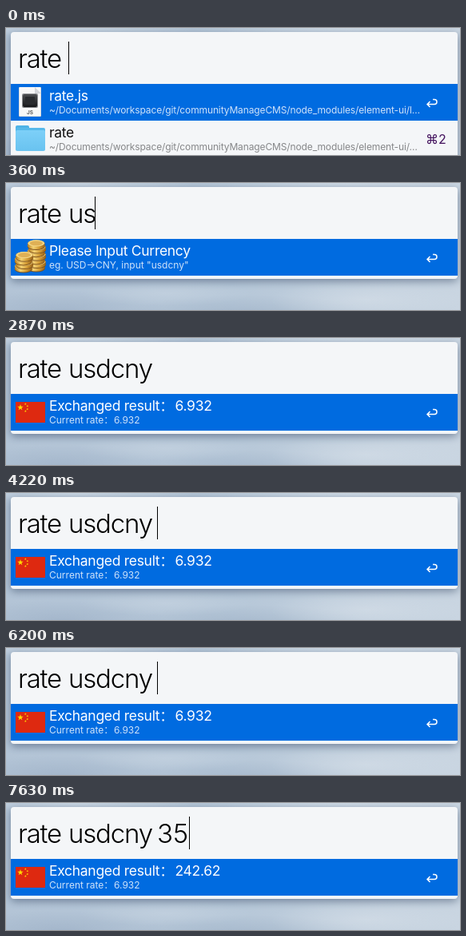
Write an HTML page with a canvas that moves like this. It is 568 px wide and 159 px high and loops after 7.99 s.

```html
<!DOCTYPE html>
<html lang="zh-CN">
<head>
<meta charset="utf-8">
<title>Currency launcher</title>
<style>
  html, body { margin: 0; width: 100%; height: 100%; overflow: hidden; background: #b4c5d7; }
  canvas, svg { position: absolute; left: 0; top: 0; width: 568px; height: 159px; }
  text {
    font-family: Inter, "Noto Sans CJK SC", "Noto Sans CJK", sans-serif;
    font-optical-sizing: none;
    white-space: pre;
  }
  .query { font-size: 33px; font-weight: 300; letter-spacing: -1.2px; fill: #000; }
  .amount { letter-spacing: 0; }
  .title { font-size: 17.5px; letter-spacing: -.3px; fill: #fff; }
  .sub { font-size: 12px; fill: #cfe2f9; }
  .path { letter-spacing: -.12px; }
  .title.plain { fill: #111; }
  .sub.plain { fill: #868789; }
  .key { font-size: 16px; fill: #45155f; }
  .badge { font-size: 6.5px; font-weight: 600; fill: #444; }
</style>
</head>
<body>
<canvas id="stage" width="568" height="159"></canvas>
<svg viewBox="0 0 568 159">
  <text class="query" x="15" y="50">rate</text>
  <text class="query" id="pair" x="78" y="50"></text>
  <text class="query amount" id="amount" x="189" y="50"></text>
  <g id="files">
    <text class="title" x="54" y="91">rate.js</text>
    <text class="sub path" x="54" y="107">~/Documents/workspace/git/communityManageCMS/node_modules/element-ui/l…</text>
    <text class="title plain" x="54" y="137">rate</text>
    <text class="sub path plain" x="54" y="153">~/Documents/workspace/git/communityManageCMS/node_modules/element-ui/…</text>
    <text class="key" x="525" y="145">⌘2</text>
    <text class="badge" x="26" y="108">JS</text>
  </g>
  <g id="prompt">
    <text class="title" x="54" y="91">Please Input Currency</text>
    <text class="sub" x="54" y="107">eg. USD-&gt;CNY, input "usdcny"</text>
  </g>
  <g id="rate">
    <text class="title" x="54" y="91">Exchanged result：</text>
    <text class="title" id="result" x="211.5" y="91"></text>
    <text class="sub" x="54" y="107">Current rate：</text>
    <text class="sub" x="135" y="107">6.932</text>
  </g>
</svg>
<script>
const LOOP = 7990;
const W = 568, H = 159;
const ctx = document.getElementById('stage').getContext('2d');
const el = id => document.getElementById(id);

// start time, currency pair, amount, caret x
const KEYS = [
  [0, '', '', 78], [270, 'u', '', 96], [360, 'us', '', 111], [450, 'usd', '', 130],
  [900, 'usdc', '', 148], [990, 'usdcn', '', 165], [1170, 'usdcny', '', 181],
  [3140, 'usdcny', '', 189], [4400, 'usdcny', '1', 206], [4490, 'usdcny', '10', 224],
  [4670, 'usdcny', '100', 245], [5930, 'usdcny', '10', 224], [6110, 'usdcny', '1', 206],
  [6200, 'usdcny', '', 189], [7360, 'usdcny', '3', 209], [7450, 'usdcny', '35', 229]
];
const VIEWS = [[0, 'files'], [360, 'prompt'], [2330, 'rate']];
const RESULTS = [
  [0, ''], [2330, '6.932'], [4670, '69.32'], [4760, '693.2'],
  [6020, '69.32'], [6200, '6.932'], [7450, '20.796'], [7630, '242.62']
];
const CARET_OFF = [[1790, 2330], [2870, 3140], [3680, 4220], [5210, 5750], [6730, 7360]];

const at = (list, t) => list.findLast(step => step[0] <= t);

function gradient(x0, y0, x1, y1, ...colors) {
  const g = ctx.createLinearGradient(x0, y0, x1, y1);
  colors.forEach((c, i) => g.addColorStop(i / (colors.length - 1), c));
  return g;
}

function rect(x, y, w, h, fill, r = 0) {
  ctx.fillStyle = fill;
  ctx.beginPath();
  ctx.roundRect(x, y, w, h, r);
  ctx.fill();
}

function ellipse(x, y, rx, ry, fill) {
  ctx.fillStyle = fill;
  ctx.beginPath();
  ctx.ellipse(x, y, rx, ry, 0, 0, Math.PI * 2);
  ctx.fill();
}

function cloud(x, y, rx, ry, rgb, alpha) {
  ctx.save();
  ctx.translate(x, y);
  ctx.scale(rx, ry);
  const g = ctx.createRadialGradient(0, 0, 0, 0, 0, 1);
  g.addColorStop(0, `rgba(${rgb},${alpha})`);
  g.addColorStop(1, `rgba(${rgb},0)`);
  ctx.fillStyle = g;
  ctx.fillRect(-1, -1, 2, 2);
  ctx.restore();
}

function wallpaper() {
  rect(0, 0, W, H, gradient(0, 0, W, 0, '#b3c4d6', '#b6c7d8', '#c9d5e1'));
  cloud(70, 160, 130, 26, '148,168,192', .5);
  cloud(300, 162, 150, 22, '150,170,193', .45);
  cloud(200, 138, 110, 16, '205,217,229', .45);
  cloud(450, 146, 120, 24, '215,224,233', .6);
  cloud(90, 0, 150, 12, '222,231,239', .6);
  cloud(420, 0, 190, 12, '222,231,239', .6);
}

function panel(height) {
  ctx.save();
  ctx.shadowColor = 'rgba(35,55,85,.5)';
  ctx.shadowBlur = 11;
  ctx.shadowOffsetY = 3;
  rect(6, 5, 559, height, '#f4f6f8', 4);
  ctx.restore();
  rect(6, 70, 559, 46, '#006be0');
}

function returnArrow() {
  ctx.strokeStyle = '#fff';
  ctx.lineWidth = 1.5;
  ctx.beginPath();
  ctx.moveTo(527, 95.5);
  ctx.lineTo(536, 95.5);
  ctx.arc(536, 92.5, 3, Math.PI / 2, -Math.PI / 2, true);
  ctx.lineTo(534, 89.5);
  ctx.moveTo(530.5, 92);
  ctx.lineTo(527, 95.5);
  ctx.lineTo(530.5, 99);
  ctx.stroke();
}

function scriptIcon() {
  rect(16, 74, 28, 37, '#b9bec6', 1);
  rect(16.5, 74, 27, 36.5, '#f8f8f8', 1);
  ctx.fillStyle = '#d4d6da';
  ctx.beginPath();
  ctx.moveTo(36, 74);
  ctx.lineTo(44, 82);
  ctx.lineTo(36, 82);
  ctx.fill();
  rect(20, 82, 20, 18, '#8b8d90', 2);
  rect(21, 83, 18, 16, gradient(0, 83, 0, 99, '#4b4d50', '#17181a'), 2);
  rect(24, 86, 12, 10, '#292b2e', 1);
}

function folderIcon() {
  rect(12, 122, 17, 10, '#4eb3e6', 2);
  rect(12, 125, 37, 28, '#56b9ea', 2);
  rect(12, 128, 37, 26, gradient(0, 128, 0, 154, '#7dd0f8', '#69c3f0'), 2);
}

function coinStack(x, bottom, count) {
  for (let i = 0; i < count; i++) {
    const y = bottom - i * 4.6, dx = x + (i % 2 ? .8 : -.4);
    const edge = gradient(dx - 11, 0, dx + 11, 0, '#b47a1d', '#f4d273', '#d39b34', '#94601a');
    ellipse(dx, y, 11, 4.6, '#80521a');
    ellipse(dx, y - 1, 11, 4.6, edge);
    ellipse(dx, y - 3.4, 11, 4.6, edge);
    ellipse(dx, y - 4, 10.4, 4.1, '#f3d583');
    ellipse(dx, y - 4, 8, 2.9, '#dfb055');
  }
}

function coinsIcon() {
  coinStack(38.2, 107, 7);
  coinStack(22.2, 108, 4);
}

function star(x, y, r, turn) {
  ctx.fillStyle = '#ffde00';
  ctx.beginPath();
  for (let i = 0; i < 10; i++) {
    const a = turn + i * Math.PI / 5, d = i % 2 ? r * .382 : r;
    ctx.lineTo(x + d * Math.sin(a), y - d * Math.cos(a));
  }
  ctx.fill();
}

function flagIcon() {
  rect(12, 80, 37, 26, '#de2910');
  star(18, 87, 4, 0);
  [[24.3, 82.6], [26.8, 85.2], [26.8, 89], [24.3, 91.6]]
    .forEach(([x, y], i) => star(x, y, 1.5, i * .4));
}

const ICONS = {
  files() { scriptIcon(); folderIcon(); },
  prompt: coinsIcon,
  rate: flagIcon
};

function setText(id, value) {
  const node = el(id);
  if (node.textContent !== value) node.textContent = value;
}

function render(t) {
  const [, pair, amount, caretX] = at(KEYS, t);
  const view = at(VIEWS, t)[1];

  wallpaper();
  panel(view === 'files' ? 170 : 115);
  ICONS[view]();
  returnArrow();
  if (!CARET_OFF.some(([from, to]) => t >= from && t < to)) {
    rect(caretX, 17, 1, 41, '#000');
  }

  setText('pair', pair);
  setText('amount', amount);
  setText('result', at(RESULTS, t)[1]);
  for (const name in ICONS) el(name).style.display = name === view ? '' : 'none';
}

function tick() {
  render(performance.now() % LOOP);
  requestAnimationFrame(tick);
}
tick();
</script>
</body>
</html>
```
